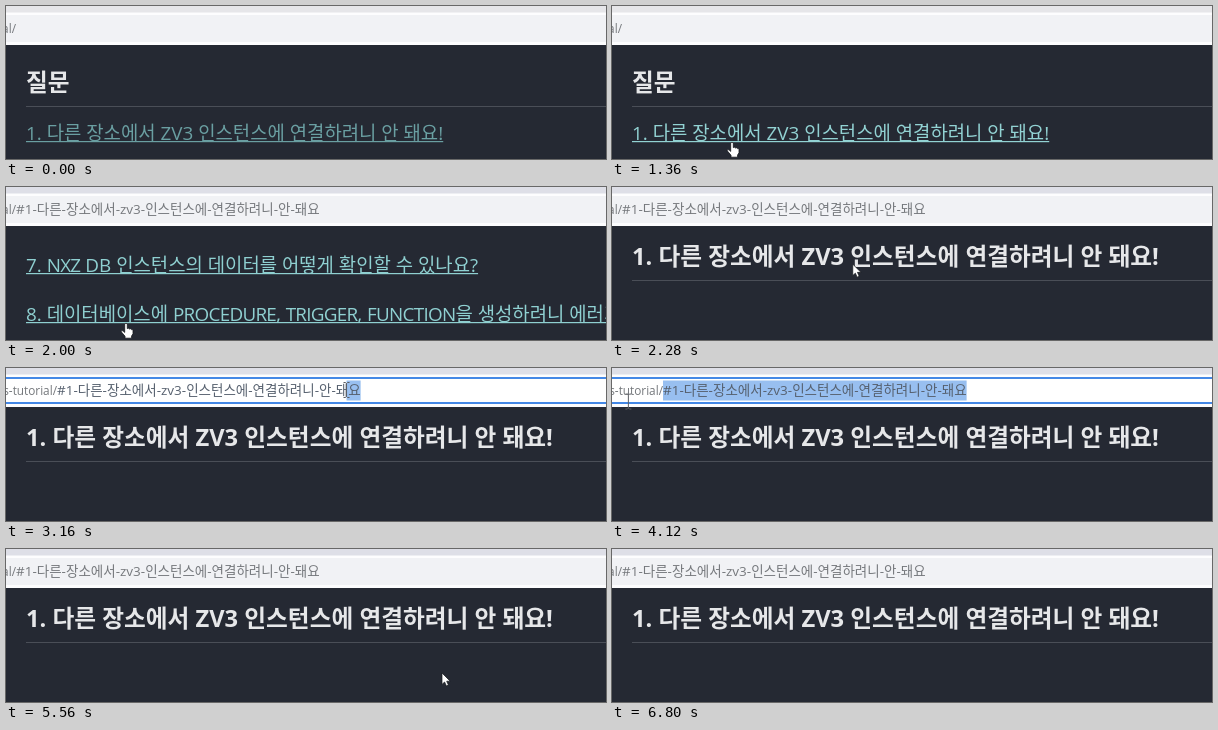
An HTML page that plays this animation: 600x153 px, repeating every 7920 ms.

```html
<!DOCTYPE html>
<html lang="ko">
<head>
<meta charset="utf-8">
<title>질문 목차</title>
<style>
  html, body { margin: 0; width: 100%; height: 100%; overflow: hidden; background: #252933; }
  svg { display: block; width: 600px; height: 153px; }
  text { font-family: "Open Sans", "Noto Sans CJK KR", "Noto Sans KR", "Noto Sans CJK JP", "Noto Sans CJK", sans-serif; white-space: pre; }
  .head { font-size: 23.7px; font-weight: 700; fill: #e6e7e9; }
  .link { font-size: 18.85px; }
  .caps { letter-spacing: -.038em; }
  .url { font-size: 13.5px; fill: #75787c; }
  .base { font-size: 11.8px; fill: #75787c; }
  .rule { stroke: #4a4e57; stroke-width: 1; }
</style>
</head>
<body>
<svg viewBox="0 0 600 153" xmlns="http://www.w3.org/2000/svg">
  <rect width="600" height="153" fill="#252933"/>
  <g id="page">
    <text class="head" x="20" y="85">질문</text>
    <path class="rule" d="M20 100.5H600"/>
    <g id="list"></g>
    <g id="section">
      <text class="head" x="20" y="78">1. 다른 장소에서 ZV3 인스턴스에 연결하려니 안 돼요!</text>
      <path class="rule" d="M20 93.5H600"/>
    </g>
  </g>
  <rect width="600" height="39" fill="#fdfdfe"/>
  <rect id="tabs" width="600" height="6.5"/>
  <rect id="field" x="-20" y="10" width="640" height="25" stroke-width="2"/>
  <rect id="mark" y="12.5" height="20" fill="#98bff0"/>
  <g id="address">
    <text class="base" x="10" y="26.5" text-anchor="end">s-tutorial/</text>
    <text class="url" id="hash" x="10" y="27">#1-다른-장소에서-zv3-인스턴스에-연결하려니-안-돼요</text>
  </g>
  <g id="cursor">
    <path id="arrow" d="M0 0V11.4L2.6 9L4.4 13L6.4 12.1L4.7 8.2H8.2Z" fill="#fff" stroke="#15171c" stroke-width=".7"/>
    <path id="hand" d="M-1.3 1Q0 -.8 1.3 1V5.6Q2.6 4.6 3.5 6Q4.8 5.2 5.5 6.6Q6.7 6.1 7 7.6V10.8L5.6 13V15.2H-1V13.2L-4.8 8.8Q-4.7 7 -3 7.8L-1.3 9.4Z" fill="#fff" stroke="#15171c" stroke-width=".8"/>
    <path id="beam" d="M-3 -7.5H-1L0 -6.5L1 -7.5H3M0 -6.5V6.5M-3 7.5H-1L0 6.5L1 7.5H3" fill="none" stroke="#5b5e63" stroke-width="1"/>
  </g>
</svg>
<script>
  const LOOP = 7920, STEP = 40;
  const ENTER = 880, HOVER = 960, CLICK = 1720, ARRIVE = 2240;
  const FOCUS = 2840, DRAG = 3080, DRAG_END = 3720, BLUR = 5160, LEAVE = 6800;
  const SHIFT = 41, HASH_X = 10, LINE = 49;
  const topics = [
    '다른 장소에서 ZV3 인스턴스에 연결하려니 안 돼요!',
    '인스턴스에 접속할 때 시간 초과가 발생해요!',
    '키 파일의 권한이 너무 열려 있다고 나와요!',
    '서버를 종료하면 웹 페이지가 열리지 않아요!',
    '보안 그룹은 어떻게 설정해야 하나요?',
    '데이터베이스에 연결하려니 안 돼요!',
    'NXZ DB 인스턴스의 데이터를 어떻게 확인할 수 있나요?',
    '데이터베이스에 PROCEDURE, TRIGGER, FUNCTION을 생성하려니 에러가 발생해요!',
    '데이터베이스의 시간대를 어떻게 변경하나요?',
    '한글 데이터가 깨져서 나와요!',
    '요금이 발생했는지 어떻게 확인하나요?'
  ];

  // Pointer strokes: begin, end, goal and, for curved ones, a control point
  const home = [13, 156];
  const strokes = [
    [840, 1360, [120, 136]],
    [2000, 2480, [320, 64], [209, 71]],
    [2520, 2800, [352, 22]],
    [DRAG, DRAG_END, [51, 22]],
    [DRAG_END, 4080, [13, 33], [35, 95]],
    [4080, 4880, [563, 122]],
    [4880, 5400, [436, 124]],
    [5560, 5960, [22, 30], [760, 60]],
    [5960, 6320, [345, 138]],
    [6320, 6480, [227, 125]],
    [6600, 6760, [193, 113]]
  ];

  const $ = id => document.getElementById(id);
  const set = (el, attrs) => { for (const k in attrs) el.setAttribute(k, attrs[k]); };
  const show = (el, on) => el.setAttribute('visibility', on ? 'visible' : 'hidden');
  const clamp = (v, a, b) => Math.min(b, Math.max(a, v));
  const mix = (a, b, p) => a.map((v, i) => v + (b[i] - v) * p);
  const ease = p => 0.5 - 0.5 * Math.cos(Math.PI * clamp(p, 0, 1));
  const scrollEase = t => ease((t - CLICK) / (ARRIVE - CLICK));
  const DISTANCE = 7 * LINE / scrollEase(2000);

  function add(parent, tag, attrs) {
    const el = document.createElementNS('http://www.w3.org/2000/svg', tag);
    set(el, attrs);
    return parent.appendChild(el);
  }

  // Words in capitals are set a little tighter
  function addLink(topic, i) {
    const y = 133.5 + i * LINE;
    const group = add($('list'), 'g', { fill: '#8fd0d1' });
    const label = add(group, 'text', { class: 'link', x: 20, y });
    `${i + 1}. ${topic}`.split(/([A-Z]{3,})/).forEach((part, k) => {
      add(label, 'tspan', { class: k % 2 ? 'caps' : '' }).textContent = part;
    });
    add(group, 'rect', { x: 20, y: y + 1.5, width: label.getComputedTextLength(), height: 1.2 });
    return group;
  }

  const links = topics.map(addLink);
  set($('section'), { transform: `translate(0 ${DISTANCE})` });

  function pointer(t) {
    let spot = home;
    for (const [begin, end, goal, bend = mix(spot, goal, 0.5)] of strokes) {
      if (t < begin) break;
      const p = ease((t - begin) / (end - begin));
      spot = mix(mix(spot, bend, p), mix(bend, goal, p), p);
    }
    return spot;
  }

  function draw(t) {
    const [x, y] = pointer(t);
    const focused = t >= FOCUS && t < BLUR;
    const selecting = focused && t >= DRAG;

    set($('page'), { transform: `translate(0 ${-DISTANCE * scrollEase(t)})` });
    const glow = clamp((t - HOVER) / 200, 0, 1);
    set(links[0], { fill: `rgb(${mix([106, 159, 162], [146, 210, 211], glow).map(Math.round)})` });

    set($('tabs'), { fill: t < CLICK ? '#e6e6e9' : '#dedfe7' });
    set($('field'), { fill: focused ? '#fff' : '#f1f2f5', stroke: focused ? '#4488e6' : '#f1f2f5' });
    set($('address'), { transform: `translate(${focused ? SHIFT : 0} 0)` });
    set($('hash'), { style: selecting ? 'fill:#56606e' : '' });
    show($('hash'), t >= CLICK);

    const start = HASH_X + SHIFT;
    const end = start + $('hash').getComputedTextLength();
    const from = t < DRAG_END ? clamp(x, start, end) : start;
    set($('mark'), { x: from, width: end - from });
    show($('mark'), selecting);

    const visible = t >= ENTER && t < LEAVE;
    const hand = t >= HOVER && t < 2120;
    const beam = !hand && y < 37;
    set($('cursor'), { transform: `translate(${x} ${y})` });
    show($('hand'), visible && hand);
    show($('beam'), visible && beam);
    show($('arrow'), visible && !hand && !beam);
  }

  const began = performance.now();
  function tick() {
    const t = (performance.now() - began) % LOOP;
    draw(Math.floor(t / STEP) * STEP);
    requestAnimationFrame(tick);
  }
  tick();
</script>
</body>
</html>
```
